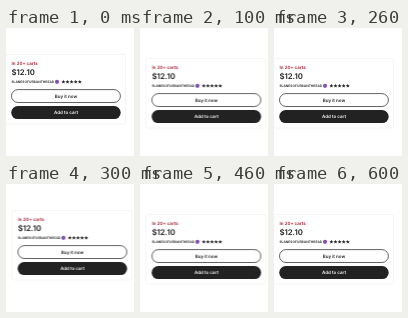
Animation, 128 px wide and 128 px high, one loop 0.7 s. Source, as an HTML page:

```html
<!DOCTYPE html>
<html lang="en">
<head>
<meta charset="utf-8">
<title>Shaking product card</title>
<style>
  html, body { margin: 0; width: 100%; height: 100%; overflow: hidden; background: #fff; }
  svg { display: block; width: 100vw; height: 100vh; }
  text { font-family: Inter, Roboto, sans-serif; font-weight: 600; fill: #222; text-rendering: geometricPrecision; }
  .carts { font-size: 4.5px; fill: #a61a2e; }
  .price { font-size: 7.8px; }
  .shop { font-size: 3.3px; }
  .label { font-size: 4.5px; text-anchor: middle; }
  .light { fill: #fff; }
</style>
</head>
<body>
<svg viewBox="0 0 128 128">
  <g id="card">
    <rect x="-.5" y="26.5" width="120" height="69.5" rx="2" fill="#fff" stroke="#f3f3f3" stroke-width=".8"/>
    <text class="carts" x="5.5" y="36.6">In 20+ carts</text>
    <text class="price" x="5.4" y="46.8">$12.10</text>
    <text class="shop" x="5.5" y="55">9LANESOFURBANTHREAD</text>
    <circle cx="51" cy="53.8" r="2.1" fill="#8150b5"/>
    <g id="stars" fill="#222"></g>
    <rect x="5.5" y="61.6" width="108.9" height="12.9" rx="6.45" fill="#fff" stroke="#222" stroke-width=".7"/>
    <text class="label" x="60" y="69.7">Buy it now</text>
    <rect x="5.2" y="78" width="109.5" height="13.1" rx="6.55" fill="#222"/>
    <text class="label light" x="60" y="86.2">Add to cart</text>
  </g>
</svg>
<script>
  const SVG = "http://www.w3.org/2000/svg";
  const STEP = 100;

  function starPoints(cx, cy, r) {
    return Array.from({ length: 10 }, (_, i) => {
      const a = i * Math.PI / 5 - Math.PI / 2;
      const d = i % 2 ? r * 0.45 : r;
      return `${cx + d * Math.cos(a)},${cy + d * Math.sin(a)}`;
    }).join(" ");
  }

  for (let i = 0; i < 5; i++) {
    const star = document.createElementNS(SVG, "polygon");
    star.setAttribute("points", starPoints(57.4 + i * 4.1, 53.9, 2.1));
    document.getElementById("stars").append(star);
  }

  // Each jolt is held for one step.
  const dx = 6.4, dy = 4;
  const jolts = [[0, 0], [dx, dy], [0, dy], [dx, 0], [dx, dy], [0, 0], [0, dy]];
  const poses = [...jolts, jolts[0]].map(([x, y], i) => ({
    offset: i / jolts.length,
    transform: `translate(${x}px, ${y}px)`,
    easing: "step-end"
  }));
  document.getElementById("card").animate(poses, {
    duration: jolts.length * STEP,
    iterations: Infinity
  });
</script>
</body>
</html>
```
